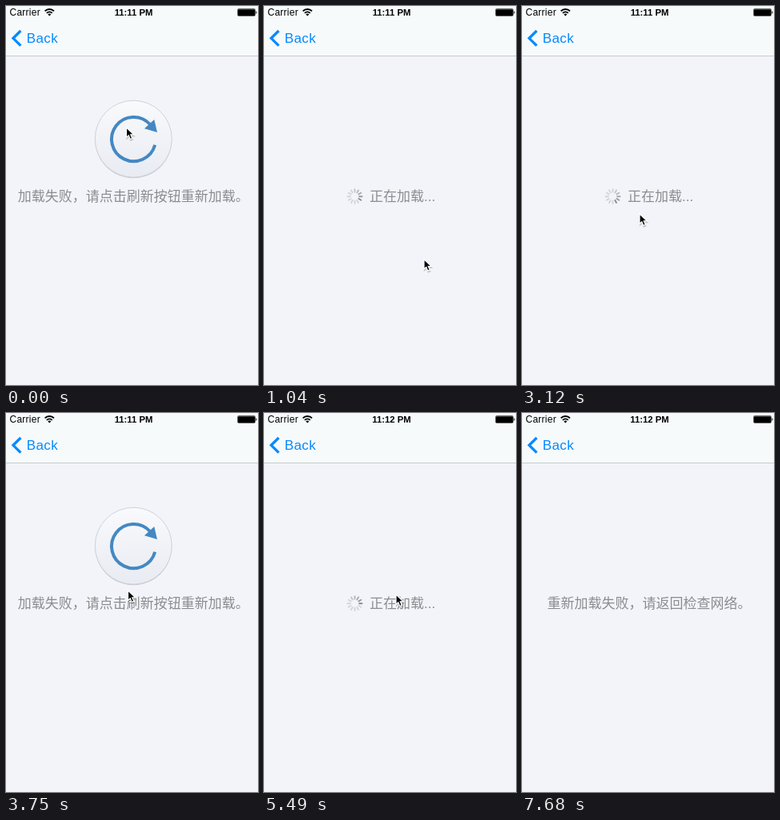
Write an HTML page that moves like this. It is 315x474 px and loops after 7.99 s.

```html
<!DOCTYPE html>
<html lang="zh-CN">
<head>
<meta charset="utf-8">
<style>
  html, body { margin: 0; width: 100%; height: 100%; overflow: hidden; background: #f2f4fa; }
  svg { display: block; width: 315px; height: 474px; font-family: "Liberation Sans", "Noto Sans CJK SC", "Noto Sans CJK", sans-serif; }
  .msg { font-size: 17px; font-weight: 300; fill: #8c8c8f; }
</style>
</head>
<body>
<svg viewBox="0 0 315 474">
  <defs>
    <linearGradient id="disc" x2="0" y2="1">
      <stop offset="0" stop-color="#f9fafc"/>
      <stop offset="1" stop-color="#e8ebf2"/>
    </linearGradient>
  </defs>
  <rect width="315" height="474" fill="#f2f4fa"/>
  <rect width="315" height="62" fill="#f7fafb"/>
  <rect y="62" width="315" height="1" fill="#c8cacc"/>

  <!-- status bar -->
  <text x="4.5" y="12.3" font-size="12" letter-spacing=".25">Carrier</text>
  <g fill="none" stroke="#000" stroke-width="1.9">
    <path d="M48.6 6.4a8 8 0 0 1 11.4 0M50.9 8.8a4.8 4.8 0 0 1 6.8 0"/>
    <path d="M54.3 12.6l-2-2.1a2.9 2.9 0 0 1 4 0z" fill="#000" stroke="none"/>
  </g>
  <text id="clock" x="159.5" y="12" font-size="11.3" font-weight="bold" text-anchor="middle"></text>
  <rect x="289.5" y="3.5" width="22" height="9" rx="1.3" fill="#f7fafb" stroke="#666"/>
  <rect x="290" y="4.3" width="21" height="7.7" rx=".6"/>
  <path d="M312.4 6.3a2 2 0 0 1 0 3.6z"/>

  <!-- navigation -->
  <path d="M18.4 31L9 40.3l9.4 9.3" fill="none" stroke="#058aff" stroke-width="3.3"/>
  <text x="25.7" y="46.2" font-size="17" letter-spacing=".4" fill="#058aff">Back</text>

  <g id="retry">
    <circle cx="159.3" cy="167.2" r="48" fill="#c2c4c9"/>
    <circle cx="159.3" cy="166.2" r="48" fill="url(#disc)" stroke="#d0d2d7"/>
    <path d="M186.2 173.8A27.6 27.6 0 1 1 180 148" fill="none" stroke="#4488c3" stroke-width="4"/>
    <path d="M185.3 142l3.7 16-16-4.7z" fill="#4488c3"/>
    <text class="msg" x="14.8" y="244.3">加载失败，请点击刷新按钮重新加载。</text>
  </g>
  <g id="loading">
    <g id="spinner" transform="translate(113.5 238.2)" stroke="#77777b" stroke-width="1.9" stroke-linecap="round"></g>
    <text class="msg" x="132" y="244.3">正在加载...</text>
  </g>
  <text id="failed" class="msg" x="31.6" y="244.3">重新加载失败，请返回检查网络。</text>

  <g id="cursor">
    <path d="M0 1v14.2l3.2-3 2.3 5.4 2.9-1.2-2.3-5.2h4.5z" opacity=".2" transform="translate(.5 1)" stroke="#000" stroke-width="1.5"/>
    <path d="M0 0v14.2l3.2-3 2.3 5.4 2.9-1.2-2.3-5.2h4.5z" stroke="#fff" stroke-width="1.4"/>
  </g>
</svg>
<script>
const LOOP = 7990, STEP = 1000 / 12;
const $ = id => document.getElementById(id);
const clamp = v => Math.max(0, Math.min(1, v));
const ramp = (t, from, to) => clamp((t - from) / (to - from));
const visible = (t, in0, in1, out0, out1) => ramp(t, in0, in1) * (1 - ramp(t, out0, out1));

// pointer stops: time, x, y
const route = [
  [0, 150.5, 152], [680, 150.5, 152], [960, 182, 270], [1320, 263, 480],
  [2690, 263, 480], [2830, 195, 312], [3010, 147, 260], [3140, 147, 260],
  [3400, 152, 228], [3730, 152, 228], [3750, 152.5, 222], [3900, 154, 160],
  [4400, 154, 160], [4680, 165, 227], [7420, 165, 227], [7680, 303, 480], [LOOP, 303, 480]
];

const spokes = Array.from({ length: 12 }, (_, i) => {
  const line = document.createElementNS("http://www.w3.org/2000/svg", "line");
  line.setAttribute("y1", -5.6);
  line.setAttribute("y2", -9);
  line.setAttribute("transform", `rotate(${i * 30})`);
  return $("spinner").appendChild(line);
});

function moveCursor(t) {
  const i = route.findIndex(p => p[0] > t);
  const [t0, x0, y0] = route[i - 1], [t1, x1, y1] = route[i];
  const k = ramp(t, t0, t1);
  const x = x0 + (x1 - x0) * k, y = y0 + (y1 - y0) * k;
  $("cursor").setAttribute("transform", `translate(${x.toFixed(1)} ${y.toFixed(1)}) scale(.87)`);
}

function spin(t) {
  const lead = Math.floor((t < 3600 ? t - 700 : t - 4235) / STEP) + 24;
  spokes.forEach((line, i) => {
    const age = (lead - i) % 12;
    line.style.opacity = Math.max(0.25, 0.85 - age * 0.12);
  });
}

function draw(now) {
  const t = now % LOOP;
  $("clock").textContent = t < 4950 ? "11:11 PM" : "11:12 PM";
  $("retry").style.opacity = t < 2000 ? 1 - ramp(t, 450, 570) : visible(t, 3390, 3480, 3967, 4087);
  $("loading").style.opacity = t < 3600
    ? visible(t, 660, 760, 3230, 3340)
    : visible(t, 4177, 4277, 6760, 6870);
  $("failed").style.opacity = ramp(t, 6920, 7030);
  spin(t);
  moveCursor(t);
}

let start;
function tick(now) {
  start ??= now;
  draw(now - start);
  requestAnimationFrame(tick);
}
draw(0);
requestAnimationFrame(tick);
</script>
</body>
</html>
```
